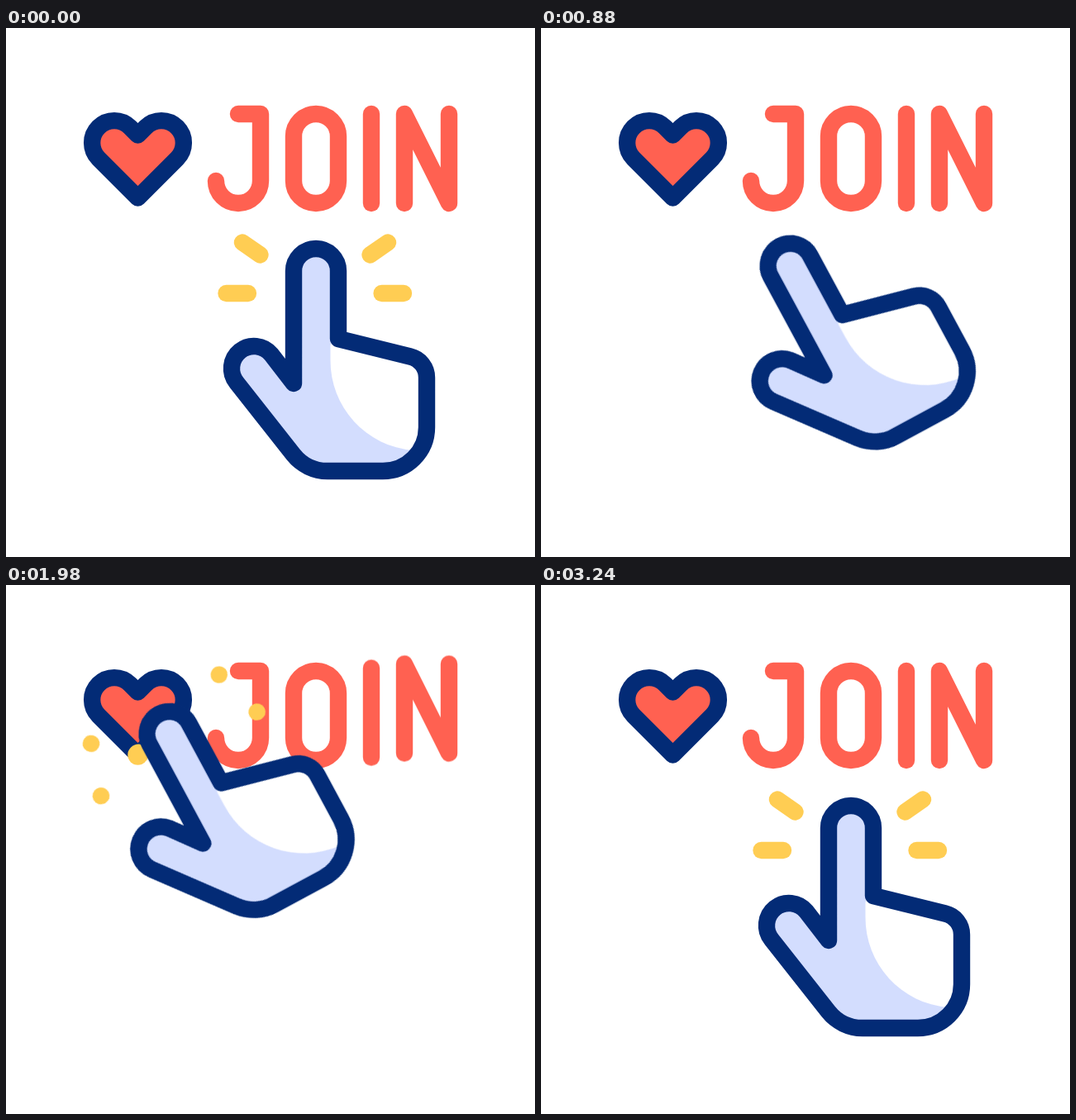
These frames come from a looping animation (640x640 px, 3.6 s). An HTML page without scripts:

```html
<!DOCTYPE html>
<html lang="en">
<head>
<meta charset="utf-8">
<title>Join</title>
<style>
  :root {
    --navy: #032b76;
    --red: #ff6151;
    --pale: #d3ddfe;
    --yellow: #ffcd53;
    --smooth: cubic-bezier(.333, 0, .667, 1);
  }
  html, body { margin: 0; height: 100%; overflow: hidden; background: #fff; }
  svg { display: block; width: 100vw; height: 100vh; }

  .line {
    fill: none;
    stroke: var(--navy);
    stroke-width: 20.4;
    stroke-linecap: round;
    stroke-linejoin: round;
  }
  .red { stroke: var(--red); }
  .yellow { stroke: var(--yellow); stroke-dasharray: 1 3; }

  .letter, .move, .turn, .spark, .trace {
    animation: 3600ms infinite var(--smooth);
  }
  .letter { animation-name: hop; animation-delay: calc(var(--i) * 40ms); }
  .move { animation-name: move; }
  .turn { animation-name: turn; transform-origin: 391px 402px; }
  .spark { animation-name: spark; animation-timing-function: linear; }
  .trace { animation-name: trace; animation-timing-function: linear; stroke-width: 24.5; }

  @keyframes hop {
    0% { transform: none; }
    45.28% { transform: none; animation-timing-function: cubic-bezier(.39, .58, .57, 1); }
    49.44% { transform: translateY(-13px); animation-timing-function: cubic-bezier(.47, 0, .75, .72); }
    53.6%, 100% { transform: none; }
  }

  @keyframes move {
    0% { transform: translate(0, 0); }
    15.14% { transform: translate(48px, 46.7px); }
    37.08%, 45% { transform: translate(-137px, -142.5px); }
    58.33% { transform: translate(-126.5px, -133px); }
    74.44% { transform: translate(.8px, -7.8px); }
    87%, 100% { transform: translate(0, 0); }
  }

  @keyframes turn {
    0% { transform: rotate(0deg); }
    7.28% { transform: rotate(8deg); }
    28.9%, 50.56% { transform: rotate(-32.8deg); }
    72.2%, 74.44% { transform: rotate(8deg); }
    88.3%, 100% { transform: rotate(0deg); }
  }

  /* offset 1 is empty, 0 is full, -1 is used up */
  @keyframes spark {
    0% { stroke-dashoffset: 0; }
    14.4% { stroke-dashoffset: -1; animation-timing-function: step-end; }
    14.5%, 45.2% { stroke-dashoffset: 1.3; }
    45.3% { stroke-dashoffset: 1; }
    50.3% { stroke-dashoffset: 0; }
    55% { stroke-dashoffset: -.99; }
    55.2% { stroke-dashoffset: -1; animation-timing-function: step-end; }
    55.3%, 82.8% { stroke-dashoffset: 1.3; }
    82.9% { stroke-dashoffset: 1; }
    90%, 100% { stroke-dashoffset: 0; }
  }

  @keyframes trace {
    0%, 45.2% { stroke-dashoffset: 1.3; }
    45.3% { stroke-dashoffset: 1; }
    50.3% { stroke-dashoffset: 0; }
    55% { stroke-dashoffset: -.996; }
    55.2% { stroke-dashoffset: -1; animation-timing-function: step-end; }
    55.3%, 100% { stroke-dashoffset: 1.3; }
  }
</style>
</head>
<body>
<svg viewBox="0 0 640 640" role="img" aria-label="JOIN">
  <defs>
    <path id="heart" pathLength="1" d="M159.5 205.5L112 158A26.8 26.8 0 0 1 150 120L159.5 129.5L169 120A26.8 26.8 0 0 1 207 158L159.5 205.5"/>
    <path id="hand" d="M348 430V294A27 27 0 0 1 402 294V376L489 397.5A26 26 0 0 1 509 423V483A53 53 0 0 1 456 536H389A53 53 0 0 1 347.6 516L279 429A27 27 0 0 1 321 395Z"/>
  </defs>

  <g class="line red">
    <path class="letter" style="--i:0" d="M281 104H308V185A27 27 0 0 1 254 185"/>
    <path class="letter" style="--i:1" d="M348 131A27 27 0 0 1 402 131V185A27 27 0 0 1 348 185Z"/>
    <path class="letter" style="--i:2" d="M442 104V212"/>
    <path class="letter" style="--i:3" d="M482 212V104L536 212V104"/>
  </g>

  <use href="#heart" class="line" style="fill:var(--red)"/>
  <use href="#heart" class="line yellow trace"/>

  <g class="move">
    <g class="turn">
      <use href="#hand" fill="var(--pale)"/>
      <path fill="#fff" d="M396 375L402 376L489 397.5A26 26 0 0 1 509 423V483L492 511A109 109 0 0 1 392.5 402V384Z"/>
      <use href="#hand" class="line"/>
      <g class="line yellow">
        <path class="spark" pathLength="1" d="M307.5 274.5L286 259.5"/>
        <path class="spark" pathLength="1" d="M293 321H266.5"/>
        <path class="spark" pathLength="1" d="M440.5 274.5L462 259.5"/>
        <path class="spark" pathLength="1" d="M454.5 321H481"/>
      </g>
    </g>
  </g>
</svg>
</body>
</html>
```
